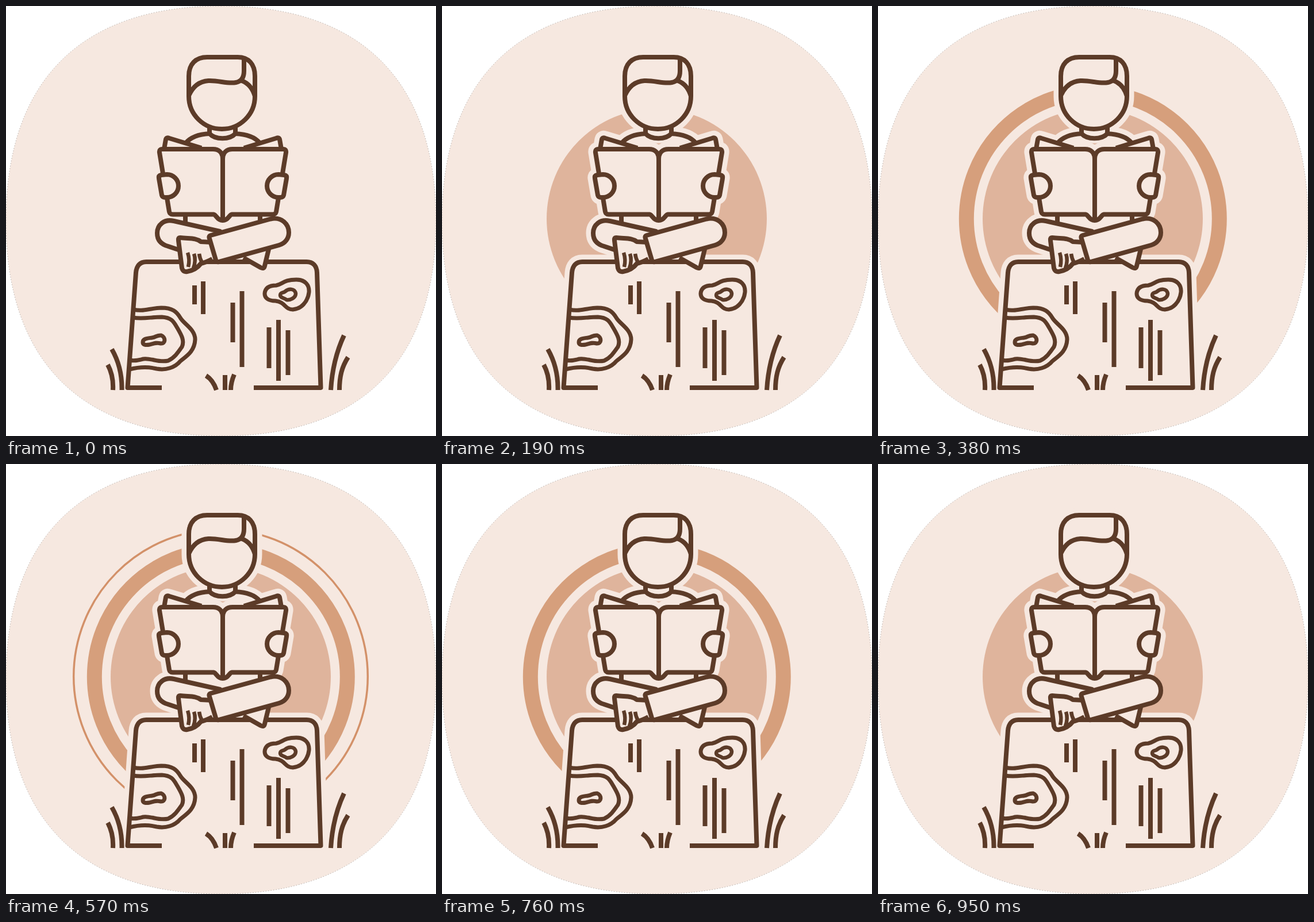
Write an HTML page that moves like this. It is 748x748 px and loops after 1140 ms.

```html
<!DOCTYPE html>
<html lang="en">
<head>
<meta charset="utf-8">
<title>Reader on a stump</title>
<style>
  html, body { margin: 0; width: 100%; height: 100%; overflow: hidden; background: #fff; }
  svg { display: block; width: 100vw; height: 100vh; }
  .paper { fill: #f6e8e0; }
  .ink { stroke: #5c3b28; stroke-width: 8; stroke-linejoin: round; }
  .line { fill: none; }
  .halo { fill: #f6e8e0; stroke: #f6e8e0; stroke-width: 25; stroke-linejoin: round; }
</style>
</head>
<body>
<svg viewBox="0 0 748 748">
  <defs>
    <path id="stump" d="M271 664H211.500L226 464C227 452 233 445 244 445H523C534 445 540.500 452 541 464L547.500 664H431"/>
    <path id="head" d="M318 157V122C318 101 330 89 350 89H403C422 89 433 101 433 122V157C433 189 407 214 375.500 214S318 189 318 157Z"/>
    <path id="shoulders" d="M312 239C321 228 335 223 354 222V206H399V222C418 223 433 228 441 238"/>
    <path id="cover" d="M275 249L278 232Q279 228 284 230L340 247M479 249L476 232Q475 228 470 230L414 247"/>
    <path id="book" d="M377 266C377 255 370 249 360 249H272Q266 249 267 255L284 358Q285 362.500 290 362.500H361C366 363 367 373 377 373S388 363 393 362.500H464Q469 362.500 470 358L487 255Q488 249 482 249H394C384 249 377 255 377 266Z"/>
    <path id="hand" d="M280 293L270 294Q265 295 266 300L271 329Q272 333 277 333H280A20 20 0 0 0 280 293Z"/>
    <path id="backLeg" d="M372 392L292 374C275 370 263 381 263 395C263 408 271 415 282 418L306 426L372 420Z"/>
    <path id="frontLeg" d="M356 399L460 370.500C480 366 492 380 492 394C492 405 485 413 475 416L370 445Q366 446 365 442L353.500 403Q353 400 356 399Z"/>
  </defs>

  <path class="paper" d="M374 0C618 0 748 130 748 374S618 748 374 748S0 618 0 374S130 0 374 0Z"
        stroke="#a39b96" stroke-width=".8" stroke-dasharray="1.500 3"/>

  <g id="rings">
    <circle cx="373.500" cy="370" r="191.500" fill="#dfb49c"/>
    <circle cx="373.800" cy="370" r="220" fill="none" stroke="#d69f7c" stroke-width="26"/>
    <circle cx="373.500" cy="369.500" r="255.800" fill="none" stroke="#d39169" stroke-width="3.500"/>
  </g>

  <g class="halo">
    <use href="#stump"/><use href="#head"/><use href="#shoulders"/><use href="#cover"/><use href="#book"/>
    <use href="#hand"/><use href="#hand" transform="matrix(-1 0 0 1 754 0)"/>
    <use href="#backLeg"/>
    <path d="M312 362H442V440H312Z" stroke="none"/>
  </g>

  <g class="paper ink">
    <use href="#stump"/>
    <path class="line" d="M328 486V519M343 479V536M394.500 516V585M410.500 496V628M457.500 559V630M474 546V652M490.500 564V642"/>
    <g class="line" stroke-width="7">
      <path d="M222 528C237 532 249 526 270 525C290 525 297 532 303 542C309 553 329 562 329 580C328 602 312 610 303 618C294 629 278 634 262 631C246 627 231 628 215 632"/>
      <path d="M221 542C238 545 252 541 271 541C289 542 292 550 298 560C305 572 311 582 306 593C299 603 293 612 282 617C266 621 252 612 239 614C230 616 224 618 216 616"/>
      <path d="M238 585C238 578 247 578 254 577S263 572 270 573C278 576 278 588 269 587C261 585 257 587 250 589C244 590 238 590 238 585Z"/>
      <path d="M470 486C481 484 483 476 505 476C521 476 528 486 527 498C525 515 513 527 499 528C485 528 486 515 469 513C456 513 450 508 450 500C451 489 460 486 470 486Z"/>
      <path d="M485 497C492 491 502 491 504 500C504 508 494 512 488 511C483 507 477 508 477 503S482 499 485 497Z" style="stroke-width:6.500"/>
    </g>
    <path class="line" d="M186 668C187 650 184 637 177 624M201.500 668C202 641 195 616 184 597M565 668C567 635 573 605 588 573M580 668C580 645 584 628 595 611M366 668C362 656 356 648 348 643M381 668V642M391 668C391 656 394 648 397 641"/>

    <use href="#shoulders"/>
    <path class="line" d="M354 222C364 233 389 233 399 222"/>
    <use href="#head"/>
    <path class="line" d="M318 156C325 140 336 131 352 130C370 129 385 136 400 133C411 131 414 123 414 113V90M410 130C421 134 429 143 433 157"/>

    <path class="line" d="M312 362V382M442 362V380"/>
    <path d="M413 438L443 455Q449 458 450 452L457 423"/>
    <use href="#backLeg"/>
    <path d="M358 411L339 410C330 403 320 405 303 403Q299 403 300 408L306 456Q308 463 315 462C326 460 333 456 339 448Q348 446 359 440"/>
    <path class="line" d="M316 429C319 438 319 446 317 454M327 431C330 440 329 448 326 456M336 431Q337 439 341 446" style="stroke-width:6.500"/>
    <use href="#frontLeg"/>

    <use href="#cover"/>
    <use href="#book"/>
    <path class="line" d="M377 262V372"/>
    <use href="#hand"/><use href="#hand" transform="matrix(-1 0 0 1 754 0)"/>
  </g>
</svg>
<script>
  const STEP = 190, STEPS = 6;
  const rings = [...document.getElementById('rings').children];

  // Rings switch on from the inside out, then off again.
  function draw(time) {
    const step = Math.floor(time / STEP) % STEPS;
    const count = 3 - Math.abs(3 - step);
    rings.forEach((ring, i) => ring.setAttribute('visibility', i < count ? 'visible' : 'hidden'));
  }

  const start = performance.now();
  function tick() {
    draw(performance.now() - start);
    requestAnimationFrame(tick);
  }
  tick();
</script>
</body>
</html>
```
